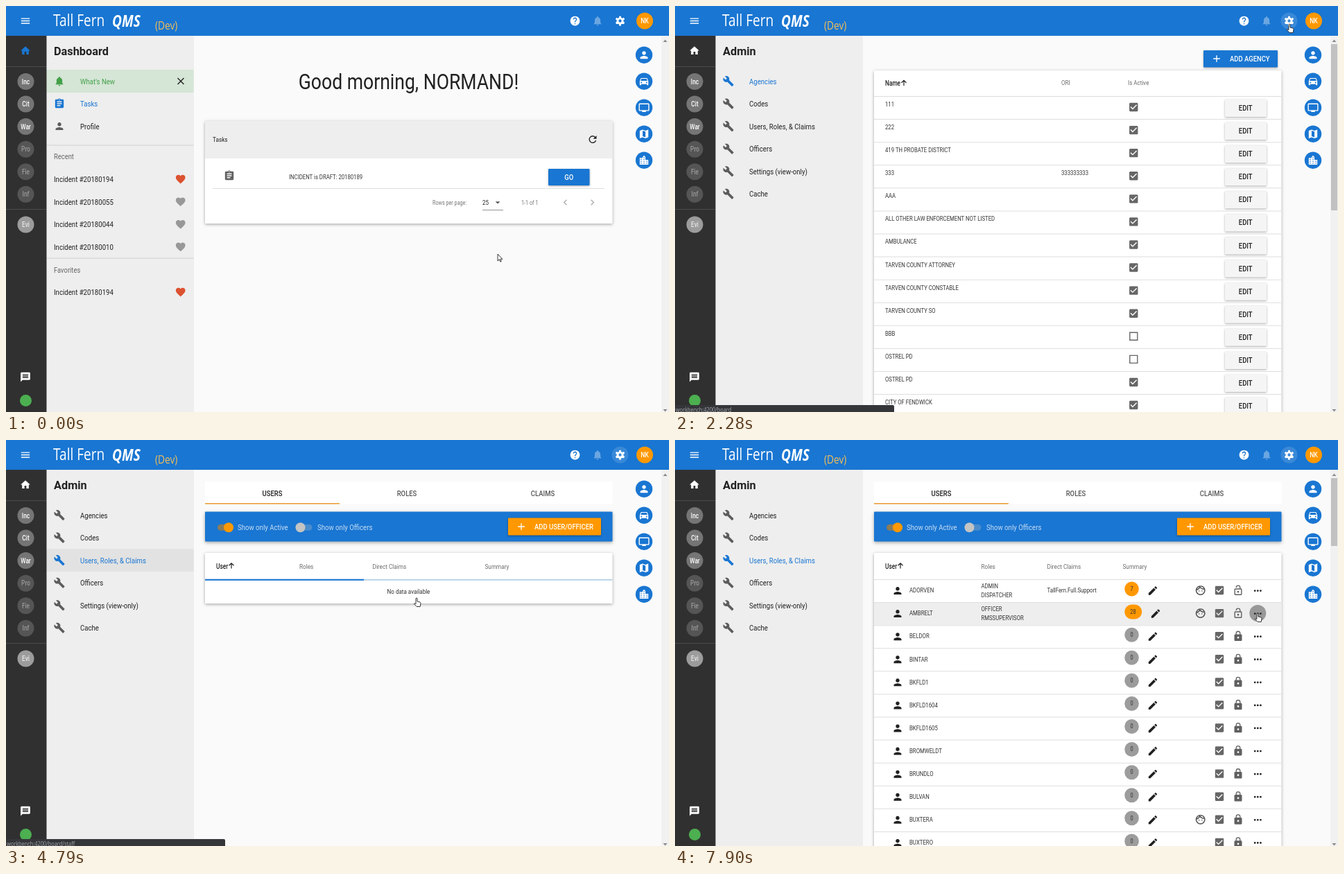
An HTML page with a canvas that plays this animation: 956 px wide and 586 px high, repeating every 8000 ms.

```html
<!DOCTYPE html>
<html lang="en">
<head>
<meta charset="utf-8">
<title>Records dashboard</title>
<style>
html, body { margin: 0; width: 100%; height: 100%; overflow: hidden; background: #fafafa; }
canvas { display: block; }
</style>
</head>
<body>
<canvas id="stage" width="956" height="586"></canvas>
<script>
const ctx = document.getElementById('stage').getContext('2d');
const LOOP = 8000;
const BLUE = '#1976d2', ORANGE = '#ff9800', INK = '#212121', GREY = '#6b6b6b', LINE = '#dedede', GREEN = '#43a047';
const CONDENSED = 0.83;

// Icons on a 24-unit grid; a number first means a stroke of that width.
const ICONS = {
  menu: [2, 'M3 7h18M3 12h18M3 17h18'],
  home: ['M10 20v-6h4v6h5v-8h3L12 3 2 12h3v8z'],
  help: ['M12 2a10 10 0 1 0 .01 0zM11 17h2v2h-2zM15.1 11.2l-.9.9C13.4 12.9 13 13.5 13 15h-2v-.5c0-1.1.4-2.1 1.2-2.8l1.2-1.3A2 2 0 1 0 10 9H8a4 4 0 1 1 7.1 2.2z'],
  bell: ['M12 22c1.1 0 2-.9 2-2h-4c0 1.1.9 2 2 2zM18 16v-5c0-3.1-1.6-5.6-4.5-6.3V4a1.5 1.5 0 0 0-3 0v.7C7.6 5.4 6 7.9 6 11v5l-2 2v1h16v-1z'],
  gear: [4.2, 'M12 6.8a5.2 5.2 0 1 1-.01 0M12 2v5M12 17v5M3.3 7l4.4 2.5M16.3 14.5l4.4 2.5M20.7 7l-4.4 2.5M7.7 14.5L3.3 17'],
  clipboard: ['M19 3h-4.2a3 3 0 0 0-5.6 0H5C4 3 3 4 3 5v14c0 1 1 2 2 2h14c1 0 2-1 2-2V5c0-1-1-2-2-2zM12 3a1 1 0 1 1-.01 0zM7 7h10v2H7zm0 4h10v2H7zm0 4h7v2H7z'],
  person: ['M12 4a4 4 0 1 1-.01 0zM12 14c-2.7 0-8 1.3-8 4v2h16v-2c0-2.7-5.3-4-8-4z'],
  heart: ['M12 21.3l-1.5-1.3C5.4 15.4 2 12.3 2 8.5 2 5.4 4.4 3 7.5 3c1.7 0 3.4.8 4.5 2.1C13.1 3.8 14.8 3 16.5 3 19.6 3 22 5.4 22 8.5c0 3.8-3.4 6.9-8.5 11.5z'],
  close: [2, 'M5.5 5.5l13 13M18.5 5.5l-13 13'],
  refresh: ['M17.6 6.4A8 8 0 1 0 19.7 14h-2.1A6 6 0 1 1 16.2 7.8L13 11h7V4z'],
  wrench: ['M22.7 19l-9.1-9.1c.9-2.3.4-5-1.5-6.9-2-2-5-2.4-7.4-1.3L9 6 6 9 1.6 4.7C.4 7.1.9 10.1 2.9 12.1c1.9 1.9 4.6 2.4 6.9 1.5l9.1 9.1c.4.4 1 .4 1.4 0l2.3-2.3c.5-.4.5-1.1.1-1.4z'],
  car: ['M18.9 6c-.2-.6-.7-1-1.4-1h-11c-.7 0-1.2.4-1.4 1L3 12v8h3v-2h12v2h3v-8zM5 11l1.5-4.5h11L19 11zM5 14.5a1.5 1.5 0 1 1 3 0 1.5 1.5 0 1 1-3 0M16 14.5a1.5 1.5 0 1 1 3 0 1.5 1.5 0 1 1-3 0'],
  monitor: ['M21 3H3C2 3 1 4 1 5v12c0 1 1 2 2 2h5v2h8v-2h5c1 0 2-1 2-2V5c0-1-1-2-2-2zM21 17H3V5h18z'],
  map: ['M20.5 3L15 5.1 9 3 3 5v16l6-2.1 6 2.1 6-2V3zM15 19l-6-2.1V5l6 2.1z'],
  city: ['M15 11V5l-3-3-3 3v2H3v14h18V11zM5 9h2v2H5zm0 4h2v2H5zm0 4h2v2H5zM11 5h2v2h-2zm0 4h2v2h-2zm0 4h2v2h-2zm0 4h2v2h-2zM17 13h2v2h-2zm0 4h2v2h-2z'],
  chat: ['M20 2H4C3 2 2 3 2 4v18l4-4h14c1 0 2-1 2-2V4c0-1-1-2-2-2zM6 6h12v2H6zm0 3h12v2H6zm0 3h12v2H6z'],
  checked: ['M19 3H5C4 3 3 4 3 5v14c0 1 1 2 2 2h14c1 0 2-1 2-2V5c0-1-1-2-2-2zM10 17l-5-5 1.4-1.4 3.6 3.6 7.6-7.6L19 8z'],
  unchecked: [2, 'M4 4h16v16H4z'],
  pencil: ['M3 17.2V21h3.8L17.8 9.9l-3.7-3.7zM20.7 7c.4-.4.4-1 0-1.4l-2.3-2.3c-.4-.4-1-.4-1.4 0l-1.9 1.8 3.8 3.8z'],
  lock: ['M18 8h-1V6A5 5 0 0 0 7 6v2H6c-1 0-2 1-2 2v10c0 1 1 2 2 2h12c1 0 2-1 2-2V10c0-1-1-2-2-2zM8.9 8V6a3.1 3.1 0 0 1 6.2 0v2zM10 15a2 2 0 1 1 4 0 2 2 0 1 1-4 0'],
  unlocked: ['M18 8h-1V6A5 5 0 0 0 7 6h1.9a3.1 3.1 0 0 1 6.2 0v2H6c-1 0-2 1-2 2v10c0 1 1 2 2 2h12c1 0 2-1 2-2V10c0-1-1-2-2-2zM18 20H6V10h12zM10 15a2 2 0 1 1 4 0 2 2 0 1 1-4 0'],
  face: [2, 'M12 3a9 9 0 1 1-.01 0M3.5 11q5-1 7-6 4 5 10 4.5M9 12.2v2M15 12.2v2'],
  dots: ['M4 12a2 2 0 1 1 4 0 2 2 0 1 1-4 0M10 12a2 2 0 1 1 4 0 2 2 0 1 1-4 0M16 12a2 2 0 1 1 4 0 2 2 0 1 1-4 0'],
  plus: [2, 'M12 5v14M5 12h14'],
  up: [2.4, 'M12 20V5M5 11.5l7-7 7 7'],
  left: [2, 'M15 6l-6 6 6 6'],
  right: [2, 'M9 6l6 6-6 6'],
  down: ['M7 10l5 5 5-5z']
};
const PATHS = {};
for (const name in ICONS) PATHS[name] = new Path2D(ICONS[name].at(-1));
const ARROW = new Path2D('M0 0v10l2.3-2.2 1.5 3.4 1.5-.7-1.5-3.2h3z');
const HAND = new Path2D('M-1 1q0-1 1-1t1 1v4l4 1q1 .3 1 1.5l-.8 5h-5l-4-4.2q.5-1.2 2.8.2z');

function rect(x, y, w, h, color, radius = 0, shadow = 0) {
  ctx.save();
  if (shadow) {
    ctx.shadowColor = 'rgba(0,0,0,.34)';
    ctx.shadowBlur = shadow;
    ctx.shadowOffsetY = shadow / 3;
  }
  ctx.fillStyle = color;
  ctx.beginPath();
  ctx.roundRect(x, y, w, h, radius);
  ctx.fill();
  ctx.restore();
}
const disc = (x, y, r, color) => rect(x - r, y - r, 2 * r, 2 * r, color, r);

function text(str, x, y, size = 11.6, color = INK, weight = '400', align = 'left', family = 'Roboto', squeeze = CONDENSED) {
  ctx.save();
  ctx.translate(x, y + size * 0.355);
  ctx.scale(squeeze, 1);
  ctx.font = `${weight} ${size}px "${family}", sans-serif`;
  ctx.textAlign = align;
  ctx.fillStyle = color;
  ctx.fillText(str, 0, 0);
  ctx.restore();
}
const label = (str, x, y, color = INK) => text(str, x, y, 11.4, color, '500', 'center');

function icon(name, x, y, color = INK, size = 16.5) {
  const width = ICONS[name].length > 1 && ICONS[name][0];
  ctx.save();
  ctx.translate(x - size / 2, y - size / 2);
  ctx.scale(size / 24, size / 24);
  ctx.fillStyle = ctx.strokeStyle = color;
  ctx.lineWidth = width;
  if (width) ctx.stroke(PATHS[name]);
  else ctx.fill(PATHS[name], 'evenodd');
  ctx.restore();
}

const clamp = v => Math.max(0, Math.min(1, v));
function mix(from, to, k) {
  const part = (hex, i) => parseInt(hex.slice(i, i + 2), 16);
  return `rgb(${[1, 3, 5].map(i => Math.round(part(from, i) + (part(to, i) - part(from, i)) * k))})`;
}

// The screen is refreshed in bursts: [first change, last change, count].
const BURSTS = [[260, 1190, 7], [1340, 2280, 7], [2430, 3360, 7], [3530, 4160, 5], [4480, 4790, 3], [6330, 7280, 7], [7430, 7900, 4]];
const TICKS = [0];
for (const [first, last, count] of BURSTS)
  for (let i = 0; i < count; i++) TICKS.push(Math.floor((first + (last - first) * i / (count - 1)) / 10) * 10);
const snap = time => TICKS.findLast(tick => tick <= time);

const ADMIN_AT = 2100, USERS_AT = 3680, DATA_AT = 6330;
const POINTER = [[0, 709, 358], [200, 709, 358], [1190, 884, 36], [1340, 886, 26], [2400, 886, 26], [3050, 228, 200],
  [3360, 188, 181], [3530, 184, 178], [4300, 184, 178], [4790, 592, 228], [6330, 592, 228], [7280, 828, 246], [7430, 840, 250]];

function pointerAt(time) {
  const next = POINTER.findIndex(key => key[0] > time);
  if (next < 0) return POINTER.at(-1).slice(1);
  const [a, b] = [POINTER[next - 1], POINTER[next]];
  const k = (time - a[0]) / (b[0] - a[0]), ease = k * k * (3 - 2 * k);
  return [a[1] + (b[1] - a[1]) * ease, a[2] + (b[2] - a[2]) * ease];
}

function drawHeader(time) {
  rect(0, 0, 956, 43, BLUE);
  icon('menu', 28, 21.5, '#fff');
  text('Tall Fern', 68, 21, 23, '#fff', '400', 'left', 'Open Sans');
  text('QMS', 153, 21.5, 23, '#fff', 'italic 700', 'left', 'Open Sans');
  text('(Dev)', 215, 28, 16.5, '#f5bf55', '400', 'left', 'Open Sans');
  icon('help', 820.5, 21.5, '#fff');
  icon('bell', 853, 21.5, '#6ba6e2');
  if (time >= 1340) disc(885.5, 21.5, 12, `rgba(255,255,255,${time < ADMIN_AT ? 0.3 : 0.14})`);
  icon('gear', 885.5, 21.5, '#fff');
  disc(921, 21.5, 12, ORANGE);
  text('NK', 921, 21.5, 10.4, '#fff', '500', 'center');
}

function drawRail(admin) {
  rect(0, 43, 58.5, 543, '#303030');
  icon('home', 28, 64.5, admin ? '#fff' : BLUE);
  rect(0, 87, 58, 1, '#4c4c4c');
  rect(0, 293, 58, 1, '#4c4c4c');
  ['Inc', 'Cit', 'War', 'Pro', 'Fie', 'Inf'].forEach((name, i) => {
    const y = 109 + 32.55 * i;
    disc(28.5, y, 12, i < 3 ? '#757575' : '#555');
    text(name, 28.5, y, 10, i < 3 ? '#fff' : '#999', '500', 'center');
  });
  disc(28.5, 315.5, 12, '#9c9c9c');
  text('Evi', 28.5, 315.5, 10, '#e6e6e6', '500', 'center');
  icon('chat', 28, 535.5, '#fff');
  disc(28.5, 569.5, 8.5, '#4caf50');
}

const heading = str => text(str, 69, 65, 16.3, INK, '700', 'left', 'Roboto', 1);

function drawDashboardMenu() {
  heading('Dashboard');
  rect(58.5, 92, 212, 33, '#d5e5d6');
  icon('bell', 77, 108.5, GREEN);
  text("What's New", 107, 108.5, 11.6, GREEN);
  icon('close', 252, 108.5);
  icon('clipboard', 77, 141, BLUE);
  text('Tasks', 107, 141, 11.6, BLUE);
  icon('person', 77, 173.5, '#5c5c5c');
  text('Profile', 107, 173.5);
  rect(58.5, 200.5, 212, 1, '#d2d2d2');
  text('Recent', 69, 217, 11.3, '#666');
  const incident = (number, y, color) => {
    text('Incident #' + number, 69, y);
    icon('heart', 251.7, y, color);
  };
  ['20180194', '20180055', '20180044', '20180010'].forEach((number, i) => incident(number, 250 + 32.6 * i, i ? '#989898' : '#dc5230'));
  rect(58.5, 363.5, 212, 1, '#d2d2d2');
  text('Favorites', 69, 380.5, 11.3, '#666');
  incident('20180194', 413, '#dc5230');
}

function drawAdminMenu(time, x, y) {
  heading('Admin');
  const fade = clamp((time - USERS_AT) / 300);
  let hovered = x > 59 && x < 271 ? Math.floor((y - 92) / 32.6) : -1;
  if (time >= 4480 && time < DATA_AT) hovered = 2;
  if (hovered >= 0 && hovered < 6) rect(58.5, 92 + 32.6 * hovered, 212, 32.6, '#e2e2e2');
  ['Agencies', 'Codes', 'Users, Roles, & Claims', 'Officers', 'Settings (view-only)', 'Cache'].forEach((name, i) => {
    const active = i === 0 ? 1 - fade : i === 2 ? fade : 0, row = 108.5 + 32.55 * i;
    icon('wrench', 77, row, mix('#5c5c5c', BLUE, active));
    text(name, 107, row, 11.6, mix(INK, BLUE, active));
  });
}

function drawDashboard() {
  text('Good morning, NORMAND!', 580.5, 108.5, 32, INK, '400', 'center');
  rect(287, 166, 587.5, 148, '#fff', 1, 4);
  rect(287, 166, 587.5, 54, '#eee');
  text('Tasks', 298, 192.5, 9.9);
  icon('refresh', 846, 192.5);
  icon('clipboard', 322, 245, '#606060');
  text('INCIDENT is DRAFT: 20180189', 408, 246.5, 9.3, '#333');
  rect(782, 235, 59.5, 24, BLUE, 1, 3);
  label('GO', 811.7, 247, '#fff');
  rect(298, 263, 565, 1, LINE);
  text('Rows per page:', 615, 283.5, 8.7, '#777');
  text('25', 687, 283.5, 9.6);
  icon('down', 709, 283.5, '#555');
  rect(687, 294, 30, 1, '#949494');
  text('1-1 of 1', 743, 283.5, 8.7, '#777');
  icon('left', 806.5, 283.5, '#aaa', 15);
  icon('right', 845.5, 283.5, '#aaa', 15);
}

const AGENCIES = ['111', '222', '419 TH PROBATE DISTRICT', '333', 'AAA', 'ALL OTHER LAW ENFORCEMENT NOT LISTED', 'AMBULANCE',
  'TARVEN COUNTY ATTORNEY', 'TARVEN COUNTY CONSTABLE', 'TARVEN COUNTY SO', 'BBB', 'OSTREL PD', 'OSTREL PD', 'CITY OF FENDWICK'];

function drawAgencies() {
  rect(762, 64, 107, 24.5, BLUE, 1, 3);
  icon('plus', 781, 76, '#fff');
  text('ADD AGENCY', 800, 76, 11.4, '#fff', '500');
  rect(287, 93, 587.5, 520, '#fff', 1, 4);
  text('Name', 303, 111, 10, INK, '500');
  icon('up', 330, 111, INK, 12);
  text('ORI', 557, 111, 9.7, GREY);
  text('Is Active', 653, 111, 9.7, GREY);
  AGENCIES.forEach((name, i) => {
    const y = 130 + 33.08 * i;
    rect(287, y, 587.5, 1, LINE);
    text(name, 303, y + 11.7, 9.3, '#333');
    if (i === 3) text('333333333', 557, y + 11.7, 9.3, '#333');
    icon(i === 10 || i === 11 ? 'unchecked' : 'checked', 661.3, y + 16, '#666');
    rect(793, y + 5, 60, 25, '#f5f5f5', 1, 3);
    label('EDIT', 822.7, y + 17);
  });
}

const USERS = ['ADORVEN', 'AMBRELT', 'BELDOR', 'BINTAR', 'BKFLD1', 'BKFLD1604', 'BKFLD1605', 'BROMWELDT', 'BRUNDLO', 'BULVAN', 'BUXTERA', 'BUXTERO'];
const ROLES = [['ADMIN', 'DISPATCHER'], ['OFFICER', 'RMSSUPERVISOR']];

function drawUserRow(name, i, hovered, halo) {
  const y = 201 + 33.08 * i, mid = y + 16, shift = i === 1 ? 2 : 0;
  if (hovered) rect(287, y, 587.5, 33, '#eee');
  rect(287, y, 587.5, 1, LINE);
  icon('person', 321, mid + 0.5);
  text(name, 338, mid, 9.4, '#333');
  (ROLES[i] || []).forEach((role, k) => text(role, 441.5, y + 10 + 13 * k, 9.3, '#333'));
  if (i === 0) text('TallFern.Full.Support', 536.5, mid, 9.4, '#333');
  rect(648.3, y + 3.5, 20.5 + shift * 2.2, 21, i < 2 ? ORANGE : '#9c9c9c', 10.3);
  text(['7', '28'][i] || '0', 658.5 + shift, y + 13.7, 8.9, '#333', '400', 'center');
  icon('pencil', 689 + shift * 2, mid + 0.5);
  if (i < 2 || i === 10) icon('face', 757.7, mid, '#505050');
  icon('checked', 785, mid, '#666');
  icon(i < 2 ? 'unlocked' : 'lock', 812, mid, '#606060');
  if (hovered && halo) disc(840.3, mid, 12, `rgba(0,0,0,${0.36 * halo})`);
  icon('dots', 840.3, mid + 0.5);
}

function drawUsers(time, y) {
  const loaded = time >= DATA_AT;
  rect(287, 60, 587.5, 32, '#fff');
  label('USERS', 384, 76.5);
  label('ROLES', 578, 76.5, '#555');
  label('CLAIMS', 774, 76.5, '#555');
  rect(287, 91, 194, 1.5, '#ea9a30');
  rect(287, 103.5, 587.5, 43, BLUE, 1, 5);
  rect(305, 121.8, 22, 9, '#8c7b58', 4.5);
  disc(321, 126.3, 7, ORANGE);
  text('Show only Active', 334, 126.2, 11.6, '#c8ddf4');
  rect(419, 121.8, 22.5, 9, '#4a8ccc', 4.5);
  disc(424.5, 126.3, 7, '#c4c4c4');
  text('Show only Officers', 449, 126.2, 11.6, '#c8ddf4');
  rect(724, 112.5, 134, 25, ORANGE, 1, 3);
  icon('plus', 743, 125, '#fff');
  text('ADD USER/OFFICER', 762, 125, 11.4, '#fff', '500');

  rect(287, 163, 587.5, loaded ? 450 : 73, '#fff', 1, 4);
  text('User', 303, 182, 10, INK, '500');
  icon('up', 325, 181.5, INK, 12);
  const columns = loaded ? [441.5, 536.5, 645.5] : [423, 528.5, 690.5];
  ['Roles', 'Direct Claims', 'Summary'].forEach((name, i) => text(name, columns[i], 182, 9.9, GREY));
  if (loaded) {
    const row = Math.floor((y - 201) / 33.08);
    USERS.forEach((name, i) => drawUserRow(name, i, i === row, clamp((time - 7300) / 400)));
  } else {
    rect(287, 200.7, 587.5, 2, '#b9d1e9');
    rect(287, 200.7, Math.max(0, (time - 3778) * 0.2263), 2, BLUE);
    text('No data available', 580.5, 219, 9.7, '#333', '400', 'center');
  }
}

function drawScrollbar(thumb) {
  rect(945, 43, 11, 543, '#f1f1f1');
  if (thumb) rect(946, 55, 9, thumb, '#c1c1c1');
  ctx.fillStyle = '#8a8a8a';
  ctx.fill(new Path2D('M947.5 52l3-3.5 3 3.5zM947.5 582l3 3.5 3-3.5z'));
}

function drawStatus(address) {
  rect(0, 576, 316, 12, '#35363a', [0, 2, 0, 0]);
  text(address, 1, 583, 8.2, '#a3a7ac', '400', 'left', 'Open Sans', 0.9);
}

function drawPointer(time, x, y) {
  const shape = time >= 1340 && time < 2430 || time >= 2890 ? HAND : ARROW;
  ctx.save();
  ctx.translate(x, y);
  ctx.fillStyle = '#fff';
  ctx.strokeStyle = '#222';
  ctx.lineWidth = 0.9;
  ctx.fill(shape);
  ctx.stroke(shape);
  ctx.restore();
}

function draw(time) {
  const [x, y] = pointerAt(time);
  const admin = time >= ADMIN_AT, users = time >= USERS_AT;
  rect(0, 0, 956, 586, '#fafafa');
  if (users) drawUsers(time, y);
  else if (admin) drawAgencies();
  else drawDashboard();
  rect(58.5, 43, 212.5, 543, '#eee');
  if (admin) drawAdminMenu(time, x, y);
  else drawDashboardMenu();
  drawRail(admin);
  drawHeader(time);
  ['person', 'car', 'monitor', 'map', 'city'].forEach((name, i) => {
    disc(920, 70.7 + 38 * i, 12.2, BLUE);
    icon(name, 920, 70.7 + 38 * i, '#fff');
  });
  drawScrollbar(!admin ? 0 : !users ? 240 : time >= DATA_AT ? 98 : 0);
  if (time >= 1490 && time < 2580) drawStatus('workbench:4200/board');
  if (time >= 3530 && time < 6640) drawStatus('workbench:4200/board/staff');
  drawPointer(time, x, y);
}

function loop() {
  draw(snap(performance.now() % LOOP));
  requestAnimationFrame(loop);
}
loop();
</script>
</body>
</html>
```
